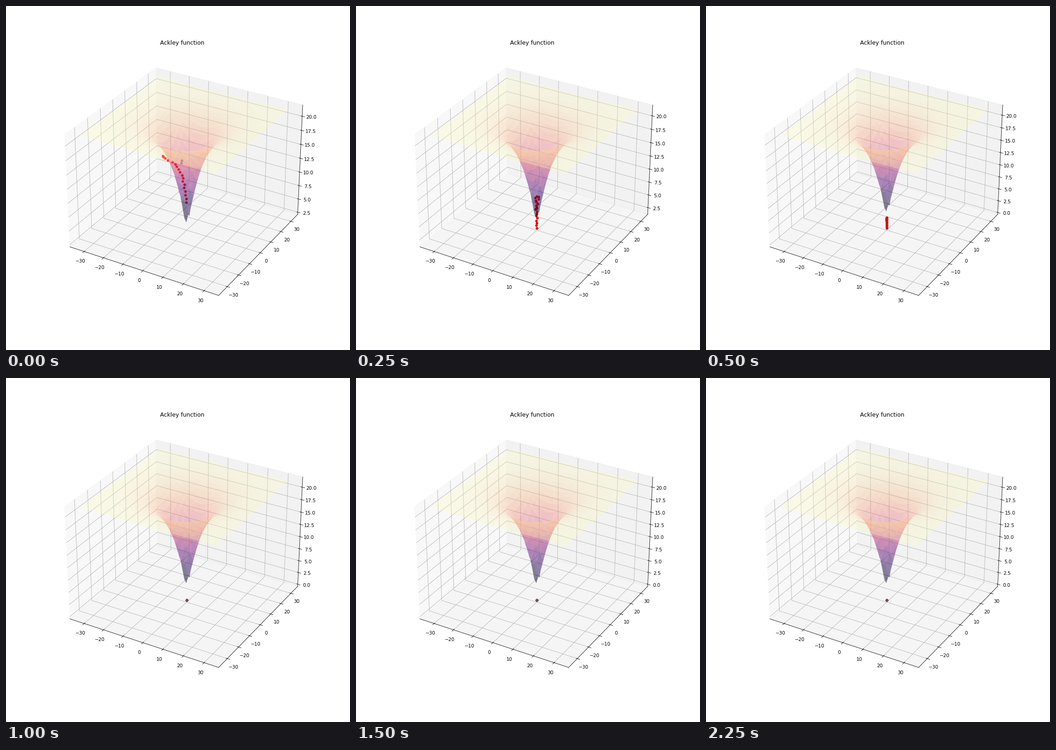
Write a matplotlib script that moves like this. It is 748x748 px and loops after 8 s.

```python
import numpy as np
import matplotlib.pyplot as plt
from matplotlib.animation import FuncAnimation

SIZE, DPI = 748, 74.8
STEP_MS, STEPS = 250, 32
PAD = 25 / 24            # pane padding around the data range
SWARM = 18


def ackley(x, y):
    bowl = -20 * np.exp(-0.2 * np.sqrt((x**2 + y**2) / 2))
    waves = -np.exp((np.cos(2 * np.pi * x) + np.cos(2 * np.pi * y)) / 2)
    return bowl + waves + 20 + np.e


axis = np.arange(-32.768, 32.768, 1)
X, Y = np.meshgrid(axis, axis)
Z = ackley(X, Y)
MID = (axis[0] + axis[-1]) / 2
HALF = (axis[-1] - axis[0]) * 1.1 * PAD / 2

# Per generation: highest and lowest value, sideways lean, spread,
# colour, and (side, value) of particles on the far wall
GENERATIONS = [
    (15.65, 7.28, -10.5, 0.7, "#ff0000", [(-2.2, 14.8), (-2.4, 14.4)]),
    (7.74, 1.60, 0, 1.0, "#e00000", [(0, 5.4)]),
    (2.29, 0.06, 0, 0.15, "#c81416", []),
    (0, 0, 0, 0, "#7d4b50", []),
]


def face_viewer(side, value):
    """Place points on the vertical plane through the optimum, facing the viewer."""
    return side * np.cos(np.pi / 6), side * np.sin(np.pi / 6), value


def swarm_points(top, bottom, lean, spread, seed):
    """Spread particles down the funnel, denser near its rim."""
    rng = np.random.default_rng(seed)
    value = top + (bottom - top) * np.linspace(0, 1, SWARM) ** 1.4
    side = lean * np.exp((value - top) / 2.35)
    # The funnel gets narrower towards its tip
    narrowing = np.linspace(1, 0.2, SWARM)
    return side + spread * narrowing * rng.uniform(-1, 1, SWARM), value


fig = plt.figure(figsize=(SIZE / DPI, SIZE / DPI), dpi=DPI)
ax = fig.add_subplot(111, projection="3d")
ax.set_title("Ackley function")
ax.plot_surface(X, Y, Z, cmap="magma", alpha=0.3, linewidth=0, antialiased=True)
ax.set_xlim(MID - HALF, MID + HALF)
ax.set_ylim(MID - HALF, MID + HALF)

drawn = []


def add_dots(side, value, color):
    drawn.append(ax.scatter(*face_viewer(side, value), color=color,
                            depthshade=False))


def draw(step):
    while drawn:
        drawn.pop().remove()
    generation = min(step, len(GENERATIONS) - 1)
    top, bottom, lean, spread, color, far = GENERATIONS[generation]
    if far:
        add_dots(*np.array(far).T, "#8a5070")
    add_dots(*swarm_points(top, bottom, lean, spread, generation), color)
    low = min(bottom, Z.min())
    margin = (Z.max() - low) * (PAD - 1) / 2
    ax.set_zlim(low - margin, Z.max() + margin)
    return drawn


anim = FuncAnimation(fig, draw, frames=STEPS, init_func=lambda: draw(0),
                     interval=STEP_MS, repeat=True, repeat_delay=0, blit=False)
plt.show()
```
